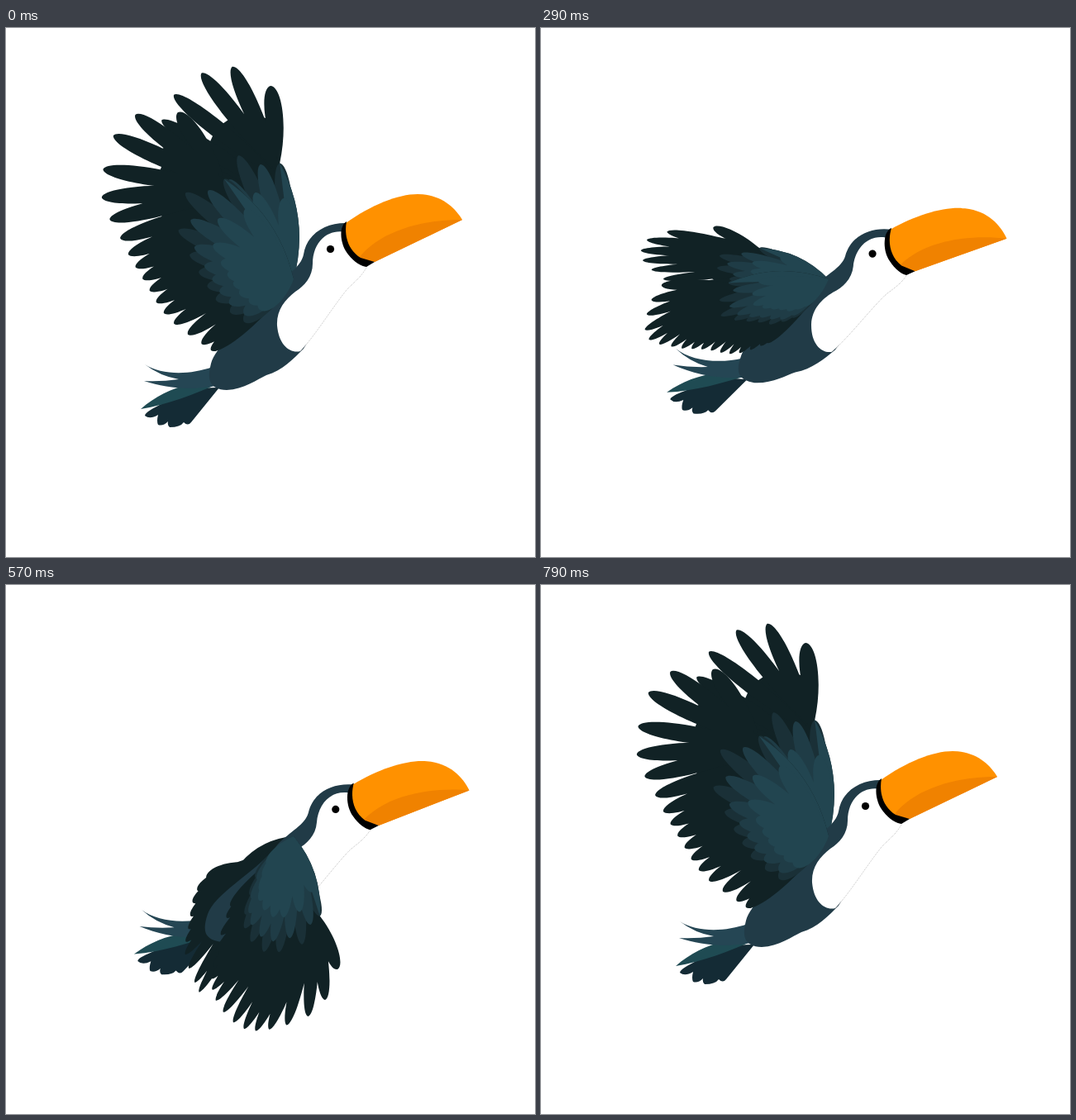
These frames come from a looping animation (640x640 px, 0.87 s). An HTML page:

```html
<!DOCTYPE html>
<html lang="en">
<head>
<meta charset="utf-8">
<title>Flying toucan</title>
<style>
html, body { margin: 0; width: 100%; height: 100%; overflow: hidden; background: #fff; }
svg { display: block; width: 100%; height: 100%; }
</style>
</head>
<body>
<svg viewBox="0 0 640 640">
  <g class="turn">
    <path fill="#142b35" d="M258 435L224 477Q220 482 215 477Q211 483 198 483Q195 481 196 476Q190 482 184 480Q182 476 184 468Q174 474 168 469Q168 465 184 457L222 436Z"/>
    <path fill="#1f4b53" d="M163 461C180 446 200 436 222 431L258 430C230 442 196 456 163 461Z"/>
    <path fill="#254654" d="M168 407C188 420 222 420 250 410L258 432C225 439 195 436 167 427Q188 428 209 425Q186 421 168 407Z"/>
  </g>
  <g id="far"></g>
  <g class="turn">
    <path fill="#213b47" d="M413 236C388 235 364 248 360 274C357 289 340 298 326 315C306 348 254 380 248 406C243 426 246 437 267 438C288 437 304 425 315 420C335 414 348 400 360 388L400 320L420 260Z"/>
    <path fill="#fff" d="M412 247C386 242 371 262 371 285C371 301 361 312 350 319C337 329 327 342 328 360C330 384 344 394 356 391C372 375 395 338 412 317C420 308 429 303 437 288Z"/>
    <path fill="none" stroke="#999" stroke-width=".6" stroke-dasharray="1 1" d="M356 391C372 375 395 338 412 317C420 308 429 303 437 288"/>
    <path fill="#ff9100" d="M411 236C442 214 474 201 498 201C526 201 543 217 552 232L446 283L428 280C412 268 409 250 411 236Z"/>
    <path fill="#f08200" d="M552 232C515 231 455 242 427 278L446 283Z"/>
    <path d="M412 234C402 240 404 262 414 274C422 284 430 288 436 289L446 283L429 278C413 268 409 250 412 234Z"/>
    <circle cx="392.5" cy="267.5" r="4.6"/>
  </g>
  <g id="near"></g>
</svg>
<script>
const DARK = '#112225', DEEP = '#1a3037', MID = '#1f3c46', LIGHT = '#224550';
const SHOULDER = [348, 304], ELBOW = [331, 326];
const FLAP = 430, LOOP = 870, STEPS = 6, TURN = 6.8;

const lerp = (a, b, t) => [a[0] + (b[0] - a[0]) * t, a[1] + (b[1] - a[1]) * t];
const xy = p => p[0].toFixed(1) + ' ' + p[1].toFixed(1) + ' ';
const path = (fill, d) => `<path fill="${fill}" d="${d}"/>`;

// A pose is two curves that the feather tips lie on, leading edge first, and a feather width.
const curve = s => s.split(' ').map(p => p.split(',').map(Number));
const pose = (near, far, width) => ({ near: curve(near), far: curve(far), width });

const up = pose('208,102 141,113 115,196 142,262 168,308 197,352 248,390',
  '320,70 258,46 192,98 200,190 260,320', 16);
const half = pose('145,157 120,193 121,256 151,295 181,324 212,362 256,377',
  '230,134 164,134 145,165 165,230 240,330', 14);
const back = pose('146,350 133,373 130,404 165,409 202,405 240,402 278,382',
  '203,268 132,279 115,304 146,324 190,337', 8);
const fold = pose('318,458 294,492 253,521 238,500 234,474 232,448 275,385',
  '243,355 228,371 209,407 186,448 205,480', 8);
const down = pose('484,472 461,535 395,552 329,570 270,523 272,458 268,392',
  '242,357 229,380 235,412 248,450 262,505', 16);

const blend = (a, b, t) => ({
  near: a.near.map((p, i) => lerp(p, b.near[i], t)),
  far: a.far.map((p, i) => lerp(p, b.far[i], t)),
  width: a.width + (b.width - a.width) * t
});
const sink = blend(fold, down, .5), rise = blend(back, half, .2);

// The bird flaps twice per loop; the second stroke starts from a half raised wing.
const strokes = [
  [up, back, sink, down, rise, half],
  [half, fold, sink, blend(down, fold, -.03), rise, up]
];

// n feather tips along a smooth curve, wider apart near the leading edge
function tipsOn(keys, n) {
  const last = keys.length - 1;
  return Array.from({ length: n }, (_, k) => {
    const u = last * Math.pow(k / (n - 1), .75), i = Math.min(last - 1, Math.floor(u)), t = u - i;
    const a = keys[Math.max(0, i - 1)], b = keys[i], c = keys[i + 1], d = keys[Math.min(last, i + 2)];
    return [0, 1].map(j => b[j] + .5 * t * (c[j] - a[j] +
      t * (2 * a[j] - 5 * b[j] + 4 * c[j] - d[j] + t * (3 * (b[j] - c[j]) + d[j] - a[j]))));
  });
}

function feather(root, tip, w) {
  const dx = tip[0] - root[0], dy = tip[1] - root[1], len = Math.hypot(dx, dy) || 1;
  const nx = -dy / len * w, ny = dx / len * w;
  const at = (t, s) => xy([root[0] + dx * t + nx * s, root[1] + dy * t + ny * s]);
  return 'M' + xy(root) + 'C' + at(.5, 1) + at(.98, .8) + xy(tip) +
    'C' + at(.98, -.8) + at(.5, -1) + xy(root) + 'Z';
}

// Leading edge from shoulder to wrist, bowed towards the beak
function edge(wrist) {
  const dx = wrist[0] - SHOULDER[0], dy = wrist[1] - SHOULDER[1];
  const bow = .2 * Math.sign(-dy - dx);
  const mid = lerp(SHOULDER, wrist, .5);
  return 'M' + xy(SHOULDER) + 'Q' + xy([mid[0] - dy * bow, mid[1] + dx * bow]) + xy(wrist);
}

function wing(keys, count, w, elbow, lit) {
  const tips = tipsOn(keys, count), last = count - 1;
  const coverts = tips.map(t => lerp(SHOULDER, t, .6));
  const wrist = coverts[0], hand = lerp(wrist, SHOULDER, .1);
  const roots = tips.map((_, i) => i ? lerp(hand, elbow, Math.max(0, i / last - .3) / .7) : wrist);
  const vane = tips.map((t, i) => lerp(t, roots[i], .46 - .2 * i / last));
  const row = (fill, odd, reach) => path(fill, coverts.filter((_, i) => i % 2 === odd)
    .map(c => feather(SHOULDER, lerp(SHOULDER, c, reach), w * .95)).join(''));

  const flight = path(DARK, edge(wrist) + 'L' + vane.map(xy).join('L') + 'Z') +
    path(DARK, tips.map((t, i) => feather(roots[i], t, w * (1 - .2 * i / last))).join(''));
  if (!lit) return flight;
  return flight + row(DEEP, 0, 1) + row(MID, 1, .9) +
    path(LIGHT, edge(wrist) + 'Q' + xy(lerp(wrist, SHOULDER, .45)) + xy(SHOULDER) + 'Z') +
    row(LIGHT, 0, .7);
}

const far = document.getElementById('far'), near = document.getElementById('near');
const turning = document.querySelectorAll('.turn');
let shown;

function draw(ms) {
  const stroke = ms < FLAP ? 0 : 1, t = ms - stroke * FLAP;
  let step = STEPS - 1;
  while (Math.floor(step * 7.25) * 10 > t) step--;
  const p = strokes[stroke][step];
  const ease = (1 - Math.cos(Math.PI * step / (STEPS - 1))) / 2;
  const angle = TURN * (stroke ? 1 - ease : ease);
  const id = stroke * STEPS + step;
  if (id === shown) return;
  shown = id;
  turning.forEach(g => g.setAttribute('transform', `rotate(${angle} 345 350)`));
  far.innerHTML = wing(p.far, 10, p.width, SHOULDER, p.far[0][1] < SHOULDER[1]);
  near.innerHTML = wing(p.near, 17, p.width, ELBOW, true);
}

const begin = performance.now();
function tick() {
  draw((performance.now() - begin) % LOOP);
  requestAnimationFrame(tick);
}
tick();
</script>
</body>
</html>
```
